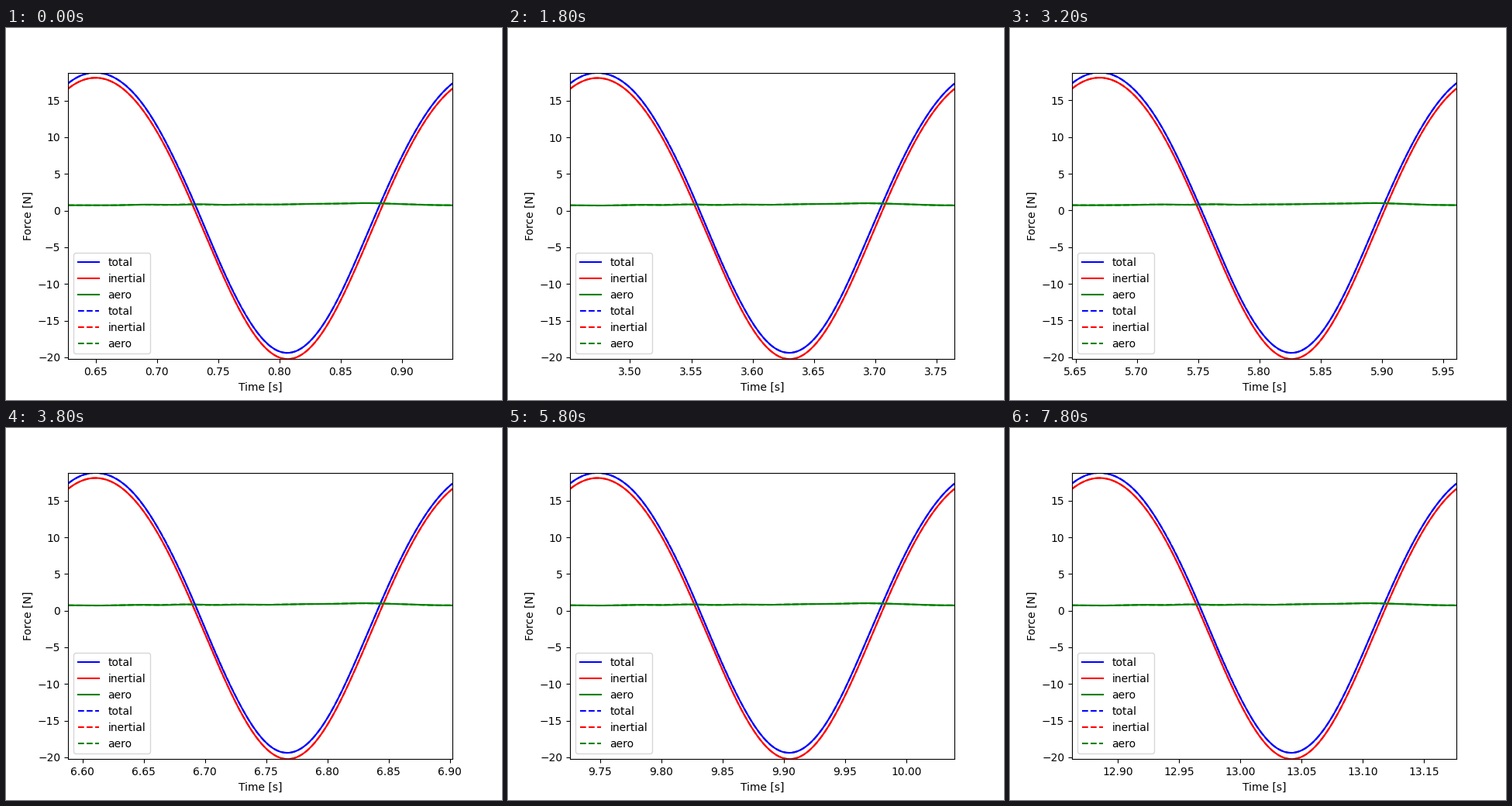
Animation, 640 px wide and 480 px high, one loop 8 s. Source, as a matplotlib script:

```python
import numpy as np
import matplotlib.pyplot as plt
from matplotlib.animation import FuncAnimation

PERIOD = 16 / 51       # seconds per flapping cycle
FIRST_CYCLE = 2
FRAMES = 40
BOTTOM = -20.25

u = np.linspace(0, 1, 401)     # phase within one cycle
AERO_U = [0, 0.08, 0.17, 0.33, 0.40, 0.52, 0.60, 0.70, 0.775, 0.85, 0.93]
AERO_F = [0.73, 0.70, 0.78, 0.82, 0.81, 0.81, 0.88, 0.94, 1.03, 0.93, 0.75]


def smooth_aero(phase):
    shifts = np.linspace(-0.03, 0.03, 13)
    return np.mean([np.interp(phase + s, AERO_U, AERO_F, period=1)
                    for s in shifts], axis=0)


angle = 2 * np.pi * (u - 0.0715)
inertial = 19.175 * np.cos(angle) - 1.075 * np.cos(2 * angle)
mean_aero = smooth_aero(u)
envelope = 0.035 * np.exp(-((u - 0.33) / 0.16) ** 2) + 0.008


def aero_force(cycle):
    """Mean lift plus a ripple that drifts from cycle to cycle."""
    return mean_aero + envelope * np.cos(2 * np.pi * 6.8 * (cycle + u - 1.318))


def upper_limit(cycle):
    drift = 0.025 * np.cos(0.4 * np.pi * (cycle - 0.5))
    settling = 0.045 * np.exp(-((cycle - 6) / 2) ** 2)
    return 18.81 + drift - settling


fig, ax = plt.subplots(figsize=(6.4, 4.8), dpi=100)
names = ("total", "inertial", "aero")
colors = ("blue", "red", "green")
lines = [ax.plot([], [], style, color=color, label=name)[0]
         for style in ("-", "--") for name, color in zip(names, colors)]
ax.set_xlabel("Time [s]")
ax.set_ylabel("Force [N]")
ax.legend(loc="lower left")


def draw(frame):
    cycle = FIRST_CYCLE + frame
    time = (cycle + u) * PERIOD
    curves = []
    for aero in (aero_force(cycle), aero_force(cycle - 1)):
        curves += [inertial + aero, inertial, aero]
    for line, force in zip(lines, curves):
        line.set_data(time, force)
    ax.set_xlim(time[0], time[-1])
    ax.set_ylim(BOTTOM, upper_limit(cycle))
    return lines


anim = FuncAnimation(fig, draw, frames=FRAMES, interval=200,
                     repeat=True, repeat_delay=0, blit=False)
plt.show()
```
